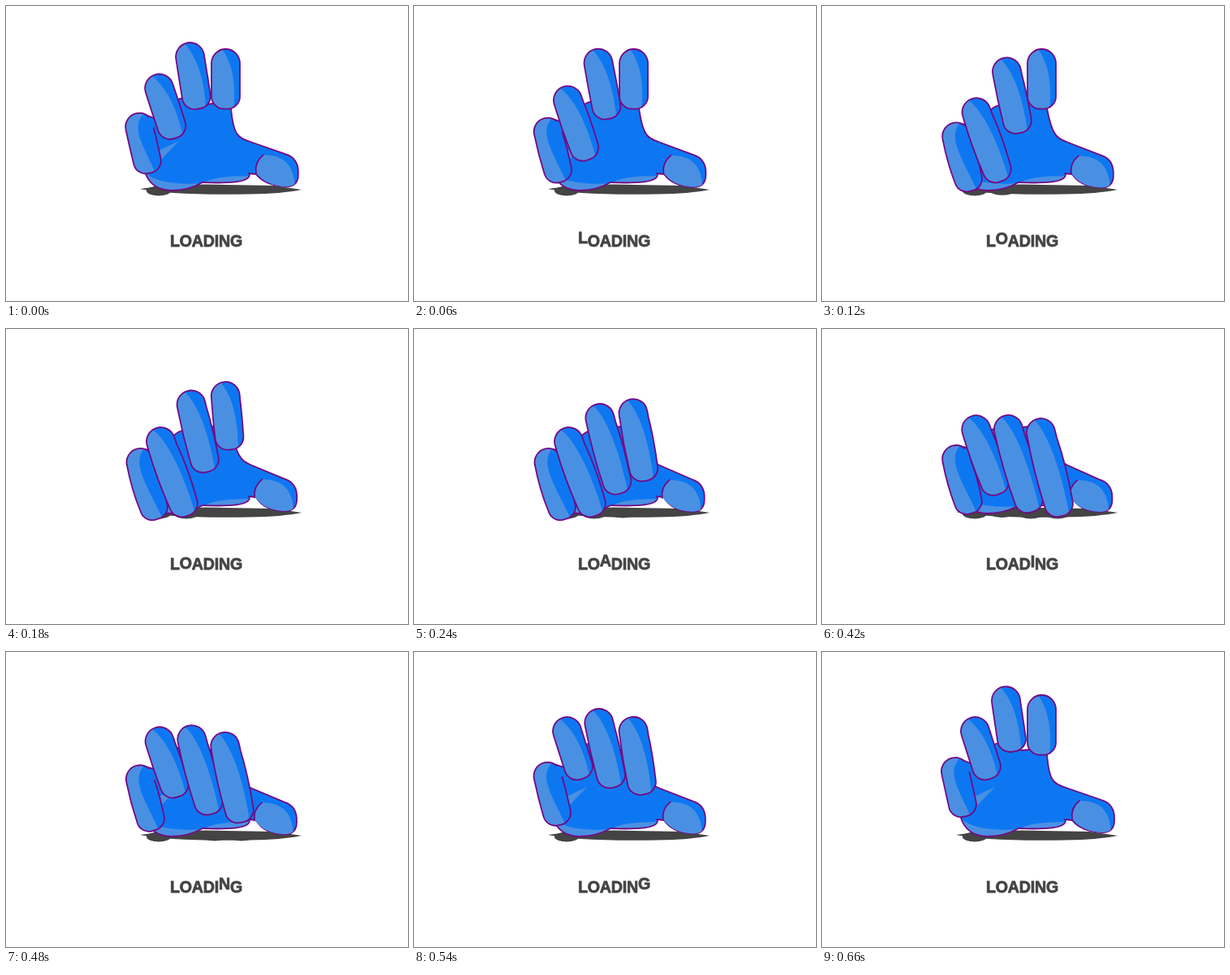
An HTML page with a canvas that plays this animation: 495 by 363 pixels, repeating every 720 ms.

```html
<!DOCTYPE html>
<html lang="en">
<head>
<meta charset="utf-8">
<title>Loading</title>
<style>
html, body { margin: 0; width: 100%; height: 100%; overflow: hidden; background: #fff; }
canvas { display: block; }
</style>
</head>
<body>
<canvas id="stage" width="495" height="363"></canvas>
<script>
const ctx = document.getElementById('stage').getContext('2d');
const BLUE = '#0d77f2', LIGHT = '#4a90e2', LINE = '#720a84', GREY = '#444';
const STEP = 60, STEPS = 12;

// Boxes are [left, top, right, bottom]; curl holds one value per step.
const pinky = { open: [147, 130, 190, 203], shut: [148.5, 147, 199, 235], width: 34,
  curl: [.1, .45, .79, 1, 1, 1, .95, .77, .55, .33, .12, 0] };
const ring = { open: [171, 80, 220, 157], shut: [173, 121, 236, 231], width: 35,
  curl: [.09, .45, .81, 1, 1, 1, .88, .64, .3, 0, 0, 0] };
const middle = { open: [209, 42.5, 251, 123], shut: [212, 106, 272, 226], width: 35,
  curl: [.04, .16, .33, .52, .78, 1, 1.03, 1, .75, .43, .16, 0] };
const index = { open: [253, 53, 288, 127], shut: [252, 110, 309, 231], width: 35,
  curl: [0, 0, 0, .21, .58, .9, 1.02, 1, .8, .47, .17, 0] };

const letterPeaks = [1, 2.2, 3.9, 5, 6.8, 8, 9];

function fillPath(path, color) {
  ctx.fillStyle = color;
  ctx.fill(path);
}

function clipped(path, light) {
  ctx.save();
  ctx.clip(path);
  fillPath(light, LIGHT);
  ctx.restore();
}

function drawFinger({ open, shut, width: w, curl }, step, merged) {
  const c = curl[step];
  const [left, top, right, bottom] = open.map((v, i) => v + (shut[i] - v) * c);
  const r = w / 2, x = left + r, y = top + r;
  const dx = Math.max(0, right - left - w), dy = bottom - y - .45 * w;
  const len = Math.hypot(dx, dy), bulge = r + 3 * c;

  ctx.save();
  ctx.translate(x, y);
  ctx.rotate(-Math.atan2(dx, dy));
  const outline = new Path2D();
  outline.moveTo(r, len * .12);
  outline.quadraticCurveTo(bulge, len * .5, r, len);
  outline.arc(.06 * w, len, .44 * w, 0, Math.PI / 2);
  outline.arc(-.06 * w, len, .44 * w, Math.PI / 2, Math.PI);
  outline.quadraticCurveTo(-bulge, len * .5, -r, 0);
  outline.arc(0, 0, r, Math.PI, Math.PI * (merged ? 1.8 : 2));
  if (!merged) outline.closePath();

  const light = new Path2D();
  if (merged) {
    light.moveTo(.4 * w, -r);
    light.bezierCurveTo(-.35 * w, -.1 * len, -.05 * w, .4 * len, .2 * w, len + r);
  } else {
    light.moveTo(-.12 * w, -r);
    light.bezierCurveTo(.2 * w, 0, .38 * w, len * .5, .27 * w, len + r);
  }
  light.lineTo(-w, len + r);
  light.lineTo(-w, -r);

  fillPath(outline, BLUE);
  clipped(outline, light);
  ctx.stroke(outline);
  ctx.restore();
}

function drawShadow(step) {
  fillPath(new Path2D(`M165 225 Q215 218 270 220 L330 221 L364 226
    Q340 231 300 231.5 Q200 233 165 225Z`), GREY);
  [[pinky, 188], [ring, 222], [middle, 257], [index, 290]].forEach(([finger, x]) => {
    const c = finger === pinky ? 1 : finger.curl[step];
    if (c < .6) return;
    ctx.beginPath();
    ctx.ellipse(x, 227.5, 15, 1.5 + 4.5 * c, 0, 0, 2 * Math.PI);
    ctx.fill();
  });
}

function drawPalm(step) {
  const a = pinky.curl[step], b = ring.curl[step];
  const t = (a + index.curl[step]) / 2, tx = -3 * t, ty = 3.5 * t, side = 7 * t;
  const palm = new Path2D(`M171 ${132 + 16 * a} L183 ${137 + 13 * a}
    L208 ${117 + 13 * b} Q212 ${113 + 13 * b} 220 ${111 + 13 * b}
    L246 121 L256 120 L277 126 Q${279 + side} 150 ${284 + side} 157 Q${287 + side} 163 302 167.5
    L${344 + tx} ${182 + ty} Q${361 + tx} ${187 + ty} ${360 + tx} ${207 + ty}
    Q${360 + tx} ${222 + ty} ${345 + tx} ${222 + ty} Q${319 + tx} ${221 + ty} 308 207
    L299 206 Q302 209 296 213 Q285 219 242 217 Q225 227 203 227 Q178 226 171 204 L177 190Z`);
  fillPath(palm, BLUE);
  clipped(palm, new Path2D('M168 202 Q185 222 243 218 Q255 209 301 209 L301 230 L168 230Z'));
  fillPath(new Path2D('M188 178 L213 166 L191 189Z'), LIGHT);
  ctx.stroke(palm);

  ctx.save();
  ctx.translate(tx, ty);
  const pad = new Path2D(`M317 183 Q307 192 308 204 Q319 221 345 222
    Q360 222 360 207 Q361 187 344 182Z`);
  clipped(pad, new Path2D('M317 183 C345 183 355 198 356 224 L300 224 L300 183Z'));
  ctx.stroke(new Path2D('M317 183 Q306 192 308 205'));
  ctx.restore();
}

function drawLabel(step) {
  ctx.font = 'bold 19.6px "Liberation Sans", Arial, sans-serif';
  ctx.fillStyle = ctx.strokeStyle = GREY;
  ctx.lineWidth = .8;
  let x = 202;
  [...'LOADING'].forEach((letter, i) => {
    const y = 296 - Math.round(4 * Math.max(0, 1 - Math.abs(step - letterPeaks[i])));
    ctx.fillText(letter, x, y);
    ctx.strokeText(letter, x, y);
    x += ctx.measureText(letter).width - .2;
  });
}

function draw(now) {
  const step = Math.floor(now / STEP) % STEPS;
  ctx.fillStyle = '#fff';
  ctx.fillRect(0, 0, 495, 363);
  ctx.strokeStyle = LINE;
  ctx.lineWidth = 1.8;
  ctx.lineJoin = ctx.lineCap = 'round';
  drawShadow(step);
  drawPalm(step);
  drawFinger(pinky, step, true);
  [ring, middle, index].forEach(finger => drawFinger(finger, step));
  drawLabel(step);
}

const start = performance.now();
function tick() {
  draw(performance.now() - start);
  requestAnimationFrame(tick);
}
tick();
</script>
</body>
</html>
```
